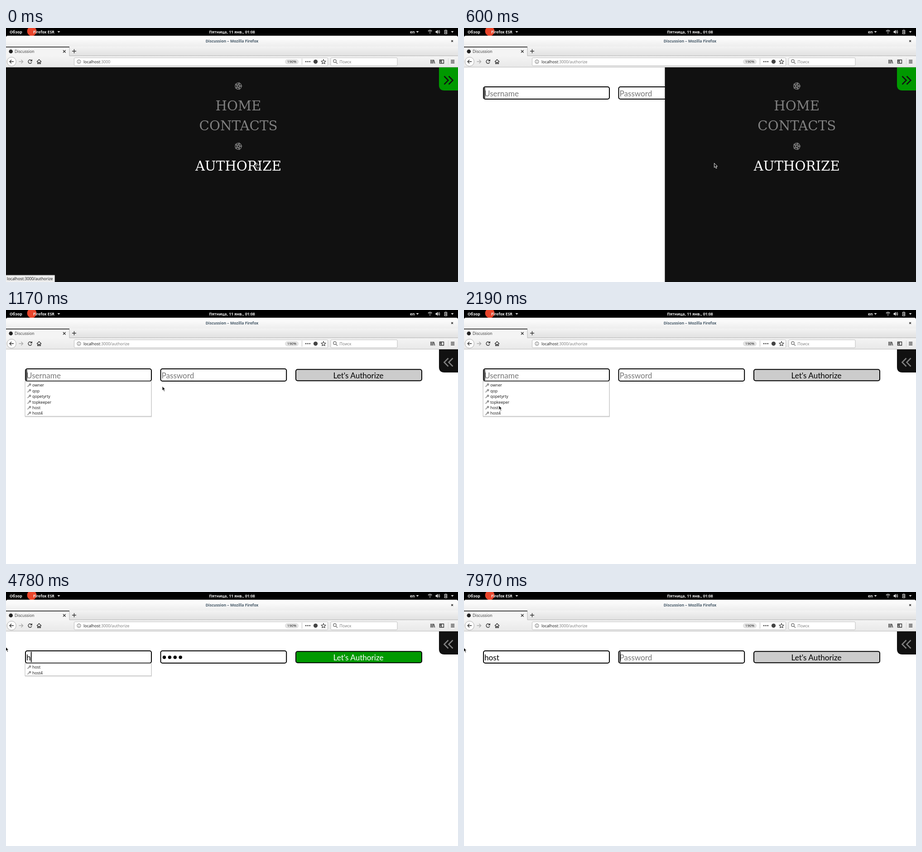
These frames come from a looping animation (998 by 561 pixels, 8 s). An HTML page:

```html
<!DOCTYPE html>
<html lang="en">
<head>
<meta charset="utf-8">
<title>Discussion</title>
<style>
  html, body { margin: 0; width: 100%; height: 100%; overflow: hidden; background: #fff; }
  svg { display: block; width: 100vw; height: 100vh; }
  text { white-space: pre; }
  .ui text { font: 8.8px "Open Sans", sans-serif; fill: #111; }
  .ui .bold { font-weight: 700; font-size: 8.6px; }
  .ui .light { fill: #eee; }
  .ui .dim { fill: #777; }
  .line { fill: none; stroke: #333; stroke-width: 1.4; }
  .page text { font: 17.1px Lato, sans-serif; }
  .page .hint { fill: #777; }
  .box { fill: #fff; stroke: #000; stroke-width: 2; }
  .menu text { font: 29.25px "DejaVu Serif", serif; text-anchor: middle; fill: #808080; }
  .pentacle { fill: none; stroke: #808080; stroke-width: 1.4; }
</style>
</head>
<body>
<svg viewBox="0 0 998 561" preserveAspectRatio="none">
  <defs>
    <linearGradient id="titleFill" x2="0" y2="1">
      <stop stop-color="#fff"/><stop offset="1" stop-color="#eee"/>
    </linearGradient>
    <linearGradient id="tabsFill" x2="0" y2="1">
      <stop stop-color="#f3f3f3"/><stop offset="1" stop-color="#e0e0e0"/>
    </linearGradient>
    <linearGradient id="toolsFill" x2="0" y2="1">
      <stop stop-color="#f4f4f4"/><stop offset="1" stop-color="#e8e8e8"/>
    </linearGradient>
    <clipPath id="panelClip"><rect id="panelArea" y="87" width="998" height="474"/></clipPath>
    <clipPath id="barClip"><rect width="998" height="17"/></clipPath>
  </defs>

  <g class="page">
    <rect class="box" x="43" y="130" width="278" height="27" rx="4"/>
    <rect class="box" x="341.5" y="130" width="277.7" height="27" rx="4"/>
    <rect id="selection" y="132" height="23" fill="#478cb2"/>
    <text id="loginHint" class="hint" x="45" y="150.5">Username</text>
    <text id="login" x="45" y="150.5"></text>
    <text id="passHint" class="hint" x="343.5" y="150.5">Password</text>
    <g id="dots"></g>
    <rect id="caret" y="132" width="1.8" height="23"/>
    <rect id="button" class="box" x="640" y="131.2" width="278" height="25" rx="4"/>
    <text id="buttonText" x="778" y="150.5" text-anchor="middle">Let's Authorize</text>
  </g>

  <g id="popup" class="ui">
    <rect id="popupShade" x="42" y="159" width="280" fill="#000" opacity=".1"/>
    <rect id="popupBox" x="42" y="157.8" width="279" fill="#fff" stroke="#b0b0b0" stroke-width=".9"/>
    <g id="rows"></g>
  </g>

  <g clip-path="url(#panelClip)">
    <rect y="87" width="998" height="474" fill="#111"/>
    <g id="menu" class="menu"></g>
  </g>
  <path id="toggle" d="M956 87h42v51h-30q-12 0-12-12z"/>
  <path id="chevrons" fill="none" stroke-width="2.6"/>

  <g class="ui">
    <rect width="998" height="87"/>
    <text class="bold light" x="8" y="12">Обзор</text>
    <circle cx="57" cy="7" r="10.5" fill="#e9452b" clip-path="url(#barClip)"/>
    <text class="bold light" x="60" y="12">Firefox ESR</text>
    <text class="bold light" x="499" y="12" text-anchor="middle">Пятница, 11 янв., 01:08</text>
    <text class="bold light" x="892" y="12">en</text>
    <path d="M113.5 7h6l-3 3.5zM905.5 7h6l-3 3.5zM982.5 7h6l-3 3.5z" fill="#ddd"/>
    <g fill="none" stroke="#ddd" stroke-width="1.2">
      <path d="M932 7q4-4 8.4 0M933.8 9q2.3-2 4.8 0"/>
      <path d="M968.5 5.2h5v7.6h-5zM970 4.5h2M971.5 7l-1 2h1.4l-1 2"/>
      <path d="M954.5 6q1.5 2.3 0 4.8M956 4.5q3 4 0 7.6"/>
    </g>
    <path d="M935 11.5l1.1 1.3 1.2-1.3-1.2-1zM948.5 6.8h2l2.8-2.8v9l-2.8-2.6h-2z" fill="#ddd"/>

    <path d="M0 41V21q0-4 4-4h990q4 0 4 4v20z" fill="url(#titleFill)"/>
    <text class="bold" x="499" y="32" text-anchor="middle" style="fill:#475a69">Discussion – Mozilla Firefox</text>
    <path class="line" d="M983.2 27l3.8 3.8m0-3.8l-3.8 3.8"/>

    <rect y="41" width="998" height="21" fill="url(#tabsFill)"/>
    <rect y="41" width="140" height="21" fill="#f4f4f4"/>
    <path d="M0 42h140" stroke="#111" stroke-width="1.6"/>
    <path d="M140 43v18.5h858" fill="none" stroke="#b5b5b5"/>
    <circle cx="10.7" cy="51.7" r="4.3" fill="#222"/>
    <text x="19" y="55.3" style="fill:#333">Discussion</text>
    <path class="line" d="M126 49l5.6 5.6m0-5.6l-5.6 5.6M146 51.2h9m-4.5-4.5v9"/>

    <rect y="62" width="998" height="25" fill="url(#toolsFill)"/>
    <path d="M0 86.5h998" stroke="#bbb"/>
    <circle cx="12.3" cy="74.3" r="10" fill="#fff" stroke="#aaa"/>
    <path class="line" d="M17 74.3H8m4-4l-4 4 4 4"/>
    <path class="line" style="stroke:#aaa" d="M28.5 74.3h9m-4-4l4 4-4 4"/>
    <path class="line" d="M56.4 72a4 4 0 1 0 .4 3.6M57.2 69.5v3.3h-3.4"/>
    <path class="line" d="M68 74.5l5-4.7 5 4.7M69.7 74v4.7h2.3v-3h2v3h2.3V74"/>

    <rect x="150.5" y="65.8" width="560" height="17.5" rx="2" fill="#fff" stroke="#bcbcbc"/>
    <circle cx="161" cy="74.3" r="4" fill="none" stroke="#666"/>
    <path d="M161 73.6v3M161 71.6v1" stroke="#666"/>
    <text x="171" y="77.7">localhost<tspan id="urlTail" class="dim"></tspan></text>
    <rect x="616.5" y="69.5" width="29" height="10" rx="5" fill="#e5e5e5" stroke="#ccc" stroke-width=".6"/>
    <text x="631" y="77.2" text-anchor="middle" style="font-size:8px">190%</text>
    <path d="M653.5 67.5v13.5" stroke="#bbb"/>
    <path d="M661 74.3h11" stroke="#444" stroke-width="2.4" stroke-dasharray="2.4 1.9"/>
    <circle cx="683.5" cy="74.3" r="4.6" fill="#444"/>
    <path class="line" style="stroke-width:1.1" d="M701 69.5l1.5 3.2 3.4.4-2.5 2.4.7 3.4-3.1-1.7-3.1 1.7.7-3.4-2.5-2.4 3.4-.4z"/>
    <rect x="717" y="65.8" width="147" height="17.5" rx="2" fill="#fff" stroke="#bcbcbc"/>
    <g class="line" style="stroke:#777"><circle cx="726" cy="73" r="3.2"/><path d="M728.3 75.4l3.6 3.6"/></g>
    <text class="dim" x="736.5" y="77.7">Поиск</text>
    <path class="line" d="M938 70v8.5m2.5-8.5v8.5m2.5-8.5v8.5m1.5-8l2.2 8"/>
    <path class="line" d="M957.5 70.5h9v7.5h-9zM961.5 70.5v7.5M958 72.5h2.5m-2.5 2.2h2.5"/>
    <path d="M976.5 67v14" stroke="#d5d5d5"/>
    <path class="line" d="M982.2 71.3h8m-8 3h8m-8 3h8"/>
  </g>

  <g id="status" class="ui">
    <path d="M-1 546h108.5v16H-1z" fill="#eee" stroke="#aaa"/>
    <text x="2" y="557.3">localhost:3000/authorize</text>
  </g>

  <path id="cursor" stroke-linejoin="round"/>
</svg>
<script>
const LOOP = 8000;
const LOGIN = "host";
const ACCOUNTS = ["owner", "qop", "qopetyrty", "topkeeper", LOGIN, LOGIN + "4"];
const ROW = 12.45;
const GREEN = "#090";
const FILLED_AT = 2400, RETYPE_AT = 4780, TAB_AT = 6070, CLEAR_AT = 6600;

// time, x, y of the pointer's hot spot
const POINTER = [
  [0, 552.5, 298.5], [660, 552.5, 298.5], [1020, 347, 172], [1130, 347, 172],
  [1170, 345.3, 168.5], [1480, 235, 136], [1850, 77, 211], [2300, 77, 211],
  [2970, 191, 135.5], [3010, 185.3, 135.5], [3530, 185.3, 135.5],
  [3750, -1, 121], [7930, -1, 121], [7970, -1, 122.5]
];
const CURSORS = {
  arrow: { d: "M0 0v9.6l2.2-2 1.7 4 1.8-.8-1.7-3.8h3z", fill: "#111", stroke: "#fff" },
  hand: { d: "M0 0q1.5-1 2 .5l1 3.5 3.5.2q2 .3 1.8 2.2l-.7 4h-6l-3.6-4.4q.4-1.5 2.8-.2z", fill: "#111", stroke: "#ddd" },
  beam: { d: "M-2-4.5h1.5l.5.5.5-.5h1.5M0-4v8M-2 4.5h1.5l.5-.5.5.5h1.5", fill: "none", stroke: "#555" }
};
// baseline or centre, half width, label
const MENU = [[128.3, 8], [181.8, 50, "HOME"], [226.3, 86, "CONTACTS"], [261.2, 8], [314.7, 95, "AUTHORIZE"]];

const $ = id => document.getElementById(id);
const set = (el, attrs) => { for (const k in attrs) el.setAttribute(k, attrs[k]); };
const show = (el, on) => { el.style.display = on ? "" : "none"; };
const clamp = (v, lo, hi) => Math.min(hi, Math.max(lo, v));
const between = (t, a, b) => t >= a && t < b;

const starPoints = [0, 2, 4, 1, 3].map(i => {
  const a = i * Math.PI * 0.4 - 1.3;
  return `${7 * Math.cos(a)},${7 * Math.sin(a)}`;
}).join(" ");
$("menu").innerHTML = MENU.map(([y, , label]) => label
  ? `<g><text y="${y}"${label === "AUTHORIZE" ? ' style="fill:#fff"' : ""}>${label}</text></g>`
  : `<g><g class="pentacle" transform="translate(0 ${y})"><circle r="7"/><polygon points="${starPoints}"/></g></g>`
).join("");

$("dots").innerHTML = [0, 1, 2, 3].map(i => `<circle cx="${349.5 + i * 11.9}" cy="144.2" r="3.7"/>`).join("");

const rowMarkup = (name, i) => `<g transform="translate(0 ${166 + i * ROW})">
  <path d="M47.5 3.5l4.5-4.5" stroke="#999" stroke-width="1.8"/>
  <circle cx="53" cy="-1.5" r="2.5" fill="#999"/>
  <text x="58" y="3.2">${name}</text></g>`;

function drawPopup(t) {
  const all = between(t, 900, FILLED_AT);
  const matching = between(t, 3600, 6120);
  show($("popup"), all || matching);
  const names = all ? ACCOUNTS : ACCOUNTS.slice(4);
  const key = names.join();
  if ($("rows").dataset.key !== key) {
    $("rows").dataset.key = key;
    $("rows").innerHTML = names.map(rowMarkup).join("");
    const height = names.length * ROW + 2.3;
    set($("popupBox"), { height });
    set($("popupShade"), { height: height + 1 });
  }
}

function drawPanel(t) {
  const k = clamp((t - 240) / 780, 0, 1);
  const left = 998 * k * k * (3 - 2 * k);
  const open = t < 1000;
  set($("panelArea"), { x: left, width: 998 - left });
  MENU.forEach(([, half], i) => {
    const centre = Math.max((left + 998) / 2 + 14, left + 28 + half);
    set($("menu").children[i], { transform: `translate(${centre} 0)` });
  });
  set($("toggle"), { fill: open ? GREEN : "#111" });
  set($("chevrons"), open
    ? { d: "M967.5 106.5l9 9-9 9m10-18l9 9-9 9", stroke: "#111" }
    : { d: "M976.5 106.5l-9 9 9 9m10-18l-9 9 9 9", stroke: "#808080" });
}

function pointerAt(t) {
  const i = POINTER.findLastIndex(p => p[0] <= t);
  const a = POINTER[i], b = POINTER[i + 1] || a;
  const k = b === a ? 0 : (t - a[0]) / (b[0] - a[0]);
  return [a[1] + (b[1] - a[1]) * k, a[2] + (b[2] - a[2]) * k];
}

function drawPointer(t, [x, y]) {
  const overInput = between(x, 42, 321) && between(y, 130, 158);
  const kind = t < 240 ? "hand" : overInput ? "beam" : "arrow";
  set($("cursor"), { ...CURSORS[kind], "stroke-width": 0.9, transform: `translate(${x} ${y})` });
}

function typedLogin(t) {
  if (t < FILLED_AT) return "";
  if (t < RETYPE_AT) return LOGIN;
  return LOGIN.slice(0, t < 5060 ? 1 : t < 5155 ? 2 : t < 5250 ? 3 : 4);
}

function drawForm(t, pointerX) {
  const login = typedLogin(t);
  const filled = between(t, FILLED_AT, CLEAR_AT);
  const passSelected = between(t, TAB_AT, CLEAR_AT);

  $("login").textContent = login;
  show($("loginHint"), !login);
  const loginEnd = 45 + (login ? $("login").getComputedTextLength() : 0);

  const dragLeft = clamp(pointerX, 44, loginEnd);
  const loginSelected = between(t, 3530, RETYPE_AT) && dragLeft < loginEnd;
  $("login").style.fill = loginSelected && dragLeft < 55 ? "#fff" : "#000";

  show($("selection"), loginSelected || passSelected);
  set($("selection"), passSelected ? { x: 344, width: 47 } : { x: dragLeft, width: loginEnd - dragLeft });

  show($("dots"), filled);
  show($("passHint"), !filled);
  set($("dots"), { fill: passSelected ? "#fff" : "#000" });

  show($("caret"), !loginSelected && !between(t, 5890, CLEAR_AT));
  set($("caret"), { x: t >= CLEAR_AT ? 343.8 : login ? loginEnd + 0.2 : 44.8 });

  $("button").style.fill = filled ? GREEN : "#ccc";
  set($("buttonText"), { fill: filled ? "#fff" : "#000" });
}

function draw(t) {
  const pointer = pointerAt(t);
  show($("status"), t < 240);
  $("urlTail").textContent = t < 240 ? ":3000" : ":3000/authorize";
  drawPanel(t);
  drawForm(t, pointer[0]);
  drawPopup(t);
  drawPointer(t, pointer);
}

const start = performance.now();
function tick() {
  draw((performance.now() - start) % LOOP);
  requestAnimationFrame(tick);
}
tick();
</script>
</body>
</html>
```
